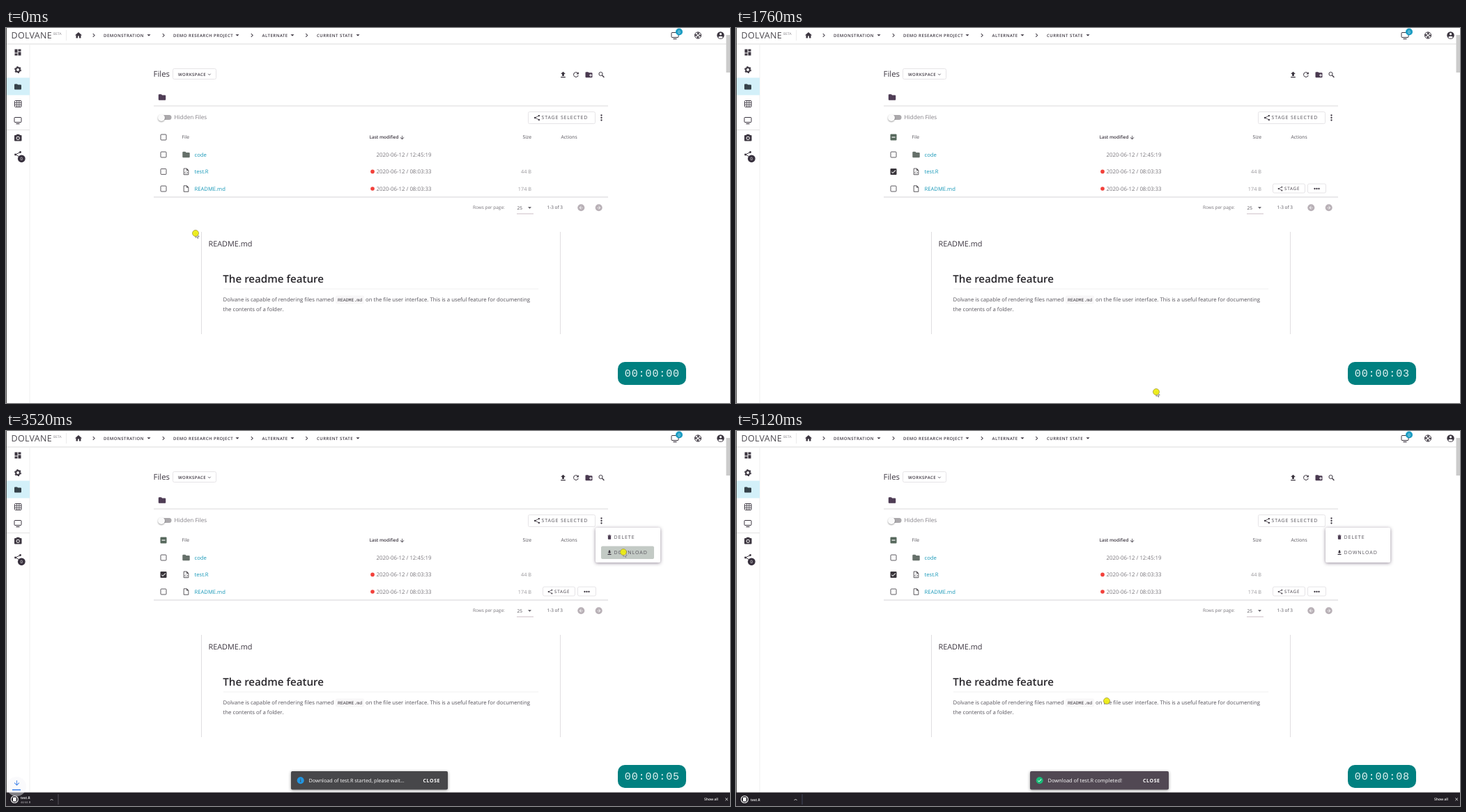
Animation of 1039 by 539 pixels, one loop 5.2 s. Source, as an HTML page with a canvas:

```html
<!DOCTYPE html>
<html lang="en">
<head>
<meta charset="utf-8">
<title>File download demo</title>
<style>
html, body { margin: 0; width: 100%; height: 100%; overflow: hidden; background: #fff; }
canvas { display: block; }
</style>
</head>
<body>
<canvas id="stage" width="1039" height="539"></canvas>
<script>
const ctx = document.getElementById('stage').getContext('2d');
const LOOP = 5200, STEP = 80;
const SANS = '"Open Sans", "Noto Sans", sans-serif';
const MONO = '"Liberation Mono", monospace';
const INK = '#3c3640', TEXT = '#55525a', LINK = '#1798b8', PALE = '#9a989c';

const ICONS = {
  home: 'M10 20v-6h4v6h5v-8h3L12 3 2 12h3v8z',
  folder: 'M10 4H4Q2 4 2 6v12q0 2 2 2h16q2 0 2-2V8q0-2-2-2h-8z',
  chevron: 'M10 6L8.6 7.4 13.2 12l-4.6 4.6L10 18l6-6z',
  drop: 'M6 9l6 6 6-6z',
  upload: 'M9 16h6v-6h4l-7-7-7 7h4zm-4 2h14v3H5z',
  download: 'M19 9h-4V3H9v6H5l7 7 7-7zM5 18v3h14v-3z',
  refresh: 'M17.6 6.4A8 8 0 1 0 19.7 14h-2.1A6 6 0 1 1 12 6q2.4 0 4.2 1.8L13 11h7V4z',
  dashboard: 'M3 13h8V3H3zm0 8h8v-6H3zm10 0h8V11h-8zm0-18v6h8V3z',
  trash: 'M6 19q0 2 2 2h8q2 0 2-2V7H6zM19 4h-3.5l-1-1h-5l-1 1H5v2h14z',
  arrow: 'M11 4v12.2l-5.6-5.6L4 12l8 8 8-8-1.4-1.4L13 16.2V4z',
  file: 'M14 2H6Q4 2 4 4v16q0 2 2 2h12q2 0 2-2V8zM6 4h7v5h5v11H6z',
  check: 'M9 16.2L4.8 12l-1.9 1.9L9 20 21.4 7.5l-1.9-1.9z'
};
for (const name in ICONS) ICONS[name] = new Path2D(ICONS[name]);

function icon(name, x, y, size, color, turn = 0) {
  ctx.save();
  ctx.translate(x, y);
  ctx.rotate(turn);
  ctx.scale(size / 24, size / 24);
  ctx.translate(-12, -12);
  ctx.fillStyle = color;
  ctx.fill(ICONS[name], 'evenodd');
  ctx.restore();
}

// y is the middle of the capitals
function text(str, x, y, size, color, { weight = 400, gap = 0, font = SANS, align = 'left' } = {}) {
  ctx.font = `${weight} ${size}px ${font}`;
  ctx.letterSpacing = gap + 'px';
  ctx.textRendering = 'geometricPrecision';
  ctx.textAlign = align;
  ctx.fillStyle = color;
  ctx.fillText(str, x, y + size * 0.357);
}

function rect(x, y, w, h, color) {
  ctx.fillStyle = color;
  ctx.fillRect(x, y, w, h);
}

function box(x, y, w, h, r, fill, stroke) {
  ctx.beginPath();
  ctx.roundRect(x, y, w, h, r);
  if (fill) { ctx.fillStyle = fill; ctx.fill(); }
  if (stroke) { ctx.strokeStyle = stroke; ctx.lineWidth = 1; ctx.stroke(); }
}

function disc(x, y, r, color) {
  ctx.beginPath();
  ctx.arc(x, y, r, 0, Math.PI * 2);
  ctx.fillStyle = color;
  ctx.fill();
}

function ring(x, y, r, color, width = 1, dash = []) {
  ctx.beginPath();
  ctx.arc(x, y, r, 0, Math.PI * 2);
  ctx.setLineDash(dash);
  ctx.strokeStyle = color;
  ctx.lineWidth = width;
  ctx.stroke();
  ctx.setLineDash([]);
}

function line(color, width, ...points) {
  ctx.beginPath();
  points.forEach(([x, y]) => ctx.lineTo(x, y));
  ctx.strokeStyle = color;
  ctx.lineWidth = width;
  ctx.stroke();
}

function withShadow(color, blur, dy, draw) {
  ctx.save();
  ctx.shadowColor = color;
  ctx.shadowBlur = blur;
  ctx.shadowOffsetY = dy;
  draw();
  ctx.restore();
}

const button = (x, y, w, h) => box(x + .5, y + .5, w - 1, h - 1, 2, '#fff', '#e6e4e7');

function share(x, y, s, color) {
  line(color, s * .09, [x + s * .32, y - s * .32], [x - s * .32, y], [x + s * .32, y + s * .32]);
  disc(x + s * .32, y - s * .32, s * .13, color);
  disc(x - s * .32, y, s * .13, color);
  disc(x + s * .32, y + s * .32, s * .13, color);
}

function monitor(x, y) {
  box(x - 5, y - 4.5, 10, 7, 1, null, INK);
  rect(x - 2.5, y + 4, 5, 1.2, INK);
}

function dots(x, y, dx, dy) {
  for (const i of [-1, 0, 1]) disc(x + i * dx, y + i * dy, 1.15, INK);
}

function checkbox(y, state) {
  if (!state) return box(222, y - 4, 8, 8, 1, '#fff', '#5d5a60');
  box(221.5, y - 4.5, 9, 9, 1, state === 'some' ? '#56685c' : '#39353b');
  if (state === 'some') rect(223.5, y - .6, 5, 1.2, '#fff');
  else icon('check', 226, y, 8, '#fff');
}

function topBar() {
  rect(0, 22.5, 1039, 1, '#dcdcdc');
  text('DOLVANE', 7.5, 10.5, 12.5, '#4a474d', { gap: .3 });
  text('BETA', 68, 8, 5, '#8b888d');
  rect(86, 3, 1, 15, '#ececec');
  icon('home', 104, 10.5, 12, INK);
  const crumbs = [
    ['DEMONSTRATION', 126, 140, 205], ['DEMO RESEARCH PROJECT', 226, 240, 332],
    ['ALTERNATE', 353, 367.5, 411], ['CURRENT STATE', 431.5, 446, 505]
  ];
  for (const [label, arrowX, x, dropX] of crumbs) {
    icon('chevron', arrowX, 10.5, 11, INK);
    text(label, x, 10.5, 6, INK, { weight: 600, gap: .5 });
    icon('drop', dropX, 10.5, 10, INK);
  }
  monitor(960, 11);
  disc(966, 5.5, 5, '#1b9cc2');
  text('0', 966, 5.5, 6, '#fff', { align: 'center' });
  ring(993, 10.5, 4.6, INK, 1);
  ring(993, 10.5, 2, INK, 1);
  const quarter = Math.PI * 3.3 / 2;
  ctx.lineDashOffset = quarter / 4;
  ring(993, 10.5, 3.3, INK, 1.8, [quarter / 2, quarter / 2]);
  ctx.lineDashOffset = 0;
  disc(1025.5, 10.5, 5.2, INK);
  disc(1025.5, 8.7, 1.6, '#fff');
  ctx.beginPath();
  ctx.ellipse(1025.5, 13.2, 3.1, 1.5, 0, 0, Math.PI * 2);
  ctx.fill();
  rect(1033.5, 10, 5.5, 54, '#cbcbcb');
}

function sideBar() {
  rect(33.5, 24, 1, 515, '#f0f0f0');
  rect(1, 71.5, 33, 25, '#d3f0f9');
  icon('dashboard', 17, 35, 12, INK);
  ring(17, 60, 2.9, INK, 2);
  ring(17, 60, 4.4, INK, 1.2, [2.3, 2.3]);
  icon('folder', 17, 84.5, 12, '#35424a');
  box(12.5, 104.5, 9.5, 9, 1, null, INK);
  for (const x of [15.6, 18.8]) line(INK, .8, [x, 104.5], [x, 113.5]);
  for (const y of [107.5, 110.5]) line(INK, .8, [12.5, y], [22, y]);
  monitor(17, 133);
  rect(1, 146, 33, 1, '#e2e2e2');
  box(12, 154, 10.5, 8.5, 1, INK);
  rect(15, 152.8, 4.5, 2, INK);
  ring(17.2, 158.3, 2.2, '#fff', 1);
  share(17, 182, 11, INK);
  disc(22.3, 187.8, 5.4, '#38313e');
  text('0', 22.3, 187.8, 6, '#fff', { align: 'center' });
  rect(0, 0, 1, 539, '#4a4a4a');
}

function toolbar() {
  text('Files', 211.5, 66, 11.4, INK);
  button(239, 58, 63, 16);
  text('WORKSPACE', 247, 66.5, 6, INK, { weight: 600, gap: .5 });
  line(INK, .8, [290, 65.8], [291.8, 67.6], [293.6, 65.8]);
  icon('upload', 799.5, 67, 11.5, INK);
  icon('refresh', 818, 67, 11.5, INK);
  icon('folder', 836.5, 67.3, 12, '#4a3a50');
  rect(837, 67.5, 4, 1, '#fff');
  rect(838.5, 66, 1, 4, '#fff');
  ring(853.5, 66, 2.6, INK, 1);
  line(INK, 1.3, [855.5, 68], [858.4, 71]);
  icon('folder', 224, 99.5, 12.5, '#4f3d55');
  rect(212, 111.5, 652, 1, '#dbd9dc');
  box(221, 125, 16.5, 7, 3.5, '#aaa8ab');
  withShadow('rgba(0,0,0,.4)', 2, 1, () => disc(223, 129, 5, '#fbfbfb'));
  text('Hidden Files', 241.5, 128, 8.2, '#858288');
  button(749, 120, 97, 18);
  share(762, 129, 9, INK);
  text('STAGE SELECTED', 768.5, 129, 7, TEXT, { gap: .85 });
  dots(854.5, 129, 0, 3.5);
}

function fileTable(picked, hoverRow) {
  checkbox(157, picked && 'some');
  text('File', 252.5, 157, 6.6, TEXT);
  text('Last modified', 521.5, 157, 6.4, INK, { weight: 600 });
  icon('arrow', 568.5, 157.5, 8.5, INK);
  text('Size', 754, 157, 6.8, TEXT, { align: 'right' });
  text('Actions', 796.5, 157, 6.8, TEXT);
  const rows = [
    ['code', 182, '12:45:19', ''], ['test.R', 206.4, '08:03:33', '44 B'], ['README.md', 231, '08:03:33', '174 B']
  ];
  rows.forEach(([name, y, time, size], i) => {
    checkbox(y, i === 1 && picked && 'on');
    icon(i ? 'file' : 'folder', 258.5, y, i ? 11.5 : 12.5, i ? '#5a575c' : '#66706a');
    if (i === 1) {
      line('#5a575c', .8, [257.8, y], [256.5, y + 1.5], [257.8, y + 3]);
      line('#5a575c', .8, [259.2, y], [260.5, y + 1.5], [259.2, y + 3]);
    }
    text(name, 270.5, y, 7.65, LINK);
    if (i) disc(526, y, 2.8, '#f2403a');
    text('2020-06-12 / ' + time, 531.5, y, 7.85, '#77747a');
    text(size, 754, y, 7.3, PALE, { align: 'right' });
    if (i === hoverRow) {
      button(770, y - 7.5, 47, 14);
      share(781, y, 7.5, INK);
      text('STAGE', 787, y, 6.2, INK, { gap: .8 });
      button(820, y - 7.5, 27, 14);
      dots(833.5, y, 3, 0);
    }
  });
  rect(212, 242.5, 652, 1, '#d6d4d7');
  text('Rows per page:', 670, 258, 6.45, '#77747a');
  text('25', 733.5, 258.3, 6.5, TEXT);
  icon('drop', 751.5, 258.5, 10, TEXT);
  rect(733, 266.5, 24, 1, '#cbbdc6');
  text('1-3 of 3', 776.5, 258, 6.45, TEXT);
  disc(825.3, 258.3, 5, '#b9b1b7');
  icon('arrow', 825.3, 258.3, 7.5, '#fff', Math.PI / 2);
  disc(850.7, 258.3, 5, '#b9b1b7');
  icon('arrow', 850.7, 258.3, 7.5, '#fff', -Math.PI / 2);
}

function preview() {
  rect(280, 293, 1, 147, '#e0dee1');
  rect(795, 293, 1, 147, '#e0dee1');
  text('README.md', 290.5, 310, 10.85, INK);
  text('The readme feature', 311.3, 360.5, 15.15, '#28262b', { weight: 600 });
  rect(312, 374.5, 452, 1, '#f2f2f2');
  text('Dolvane is capable of rendering files named', 311.5, 390, 7.8, TEXT);
  box(473, 384.5, 41, 12, 2, '#f8f7f8');
  text('README.md', 476, 390.6, 6.5, '#39363c', { font: MONO });
  text('on the file user interface. This is a useful feature for documenting', 516, 390, 7.78, TEXT);
  text('the contents of a folder.', 311.5, 404, 7.8, TEXT);
}

function menu(highlight) {
  withShadow('rgba(40,20,50,.5)', 5, 1, () => box(846, 139, 93, 50, 2, '#fff'));
  if (highlight) box(854, 165.5, 76, 18.5, 2, '#c3cac5');
  icon('trash', 866, 152.5, 8.5, '#4a3a50');
  text('DELETE', 872.5, 152.5, 7, TEXT, { gap: .95 });
  icon('download', 866, 174.7, 8.5, INK);
  text('DOWNLOAD', 872.5, 174.7, 7, TEXT, { gap: .95 });
}

function toast(x, y, w, message, closeX, done, alpha) {
  ctx.save();
  ctx.globalAlpha = alpha;
  withShadow('rgba(0,0,0,.4)', 4, 1, () => box(x, y, w, 26.5, 2, done ? '#514853' : '#47474a'));
  ctx.globalAlpha = 1;
  const cx = x + 13.7, cy = y + 13.2;
  disc(cx, cy, 5, done ? '#19bb78' : '#2196e3');
  if (done) icon('check', cx, cy, 7, '#fff');
  else {
    rect(cx - .5, cy - .7, 1, 3.2, '#47474a');
    rect(cx - .5, cy - 2.5, 1, 1, '#47474a');
  }
  text(message, x + 25.5, cy, done ? 7.45 : 7.25, '#fff');
  text('CLOSE', closeX, cy, 7, '#fff', { weight: 700, gap: .6 });
  ctx.restore();
}

function downloadBar(t) {
  const settled = t >= 3920;
  rect(0, 519.5, 1039, 19.5, '#221f25');
  const edge = settled ? 95 : 75;
  rect(edge - .5, 522, 1, 15, settled ? '#40475c' : '#55525a');
  line('#ddd', .9, [edge - 11.5, 531], [edge - 9.5, 529], [edge - 7.5, 531]);
  text('test.R', 21, settled ? 530 : 527.3, 5, '#fff', { weight: 600 });
  if (!settled) text('44/44 B', 21, 533.7, 4, '#c4c2c6');
  ring(12.3, 529.5, 5, '#e9e9e9', 1.2);
  box(10, 526.5, 4.6, 6, .8, '#fff');
  text('Show all', 1002, 529.3, 5, '#fff', { weight: 600 });
  line('#ddd', .9, [1032.3, 527.5], [1036, 531.2]);
  line('#ddd', .9, [1036, 527.5], [1032.3, 531.2]);
  if (t < 3840) {
    const drop = (t - 3680) / 16;
    ctx.save();
    ctx.globalAlpha = .45;
    disc(15, 521 + drop, 14, '#f4f5f8');
    ctx.restore();
    icon('arrow', 15.5, 516 + drop, 11, '#3b7fe8');
    rect(9, 525 + drop, 12, 1.5, '#3b7fe8');
  }
}

// time, x, y
const PATH = [
  [720, 272, 295], [960, 212, 258], [1120, 169, 223], [1200, 180, 218], [1280, 204, 217],
  [1360, 222, 208], [1440, 226, 206], [1520, 240, 218], [1600, 340, 305], [1680, 500, 445],
  [1760, 603, 523], [1840, 625, 519], [2160, 850, 360], [2400, 1025, 150], [2480, 930, 135],
  [2560, 868, 130], [2640, 859, 129], [2880, 857, 130], [3040, 870, 152], [3200, 886, 174],
  [3520, 886, 174], [3600, 745, 240], [3680, 594, 313], [3760, 556, 355], [3920, 533, 386], [4000, 532, 388]
];
const CLICKS = [1440, 2640, 3280];

function pointerAt(t) {
  const next = PATH.findIndex(p => p[0] >= t);
  if (next < 0) return PATH[PATH.length - 1].slice(1);
  if (next === 0) return PATH[0].slice(1);
  const [t0, x0, y0] = PATH[next - 1], [t1, x1, y1] = PATH[next];
  const k = (t - t0) / (t1 - t0);
  return [x0 + (x1 - x0) * k, y0 + (y1 - y0) * k];
}

function pointer(t) {
  const [x, y] = pointerAt(t);
  const r = Math.max(4.5, ...CLICKS.map(c => 12 - Math.abs(t - c) / 21.5));
  if (t < 3920) {
    ctx.beginPath();
    [[0, -1], [0, 6.5], [1.7, 5], [3, 7.5], [4, 7], [3, 4.6], [5.2, 4.6]]
      .forEach(([dx, dy]) => ctx.lineTo(x + dx, y + dy));
    ctx.closePath();
    ctx.fillStyle = '#fff';
    ctx.fill();
    ctx.strokeStyle = '#77757a';
    ctx.lineWidth = .8;
    ctx.stroke();
  }
  ctx.save();
  ctx.globalAlpha = r > 5 && r < 11 ? .8 : .93;
  disc(x, y, r, r > 5 ? '#ffe81c' : '#eeee10');
  ring(x, y, r, '#9c9340', .8);
  ctx.restore();
}

function timer(t) {
  const seconds = t < 480 ? 0 : 1 + Math.floor((t - 480) / 640);
  box(878, 480, 98, 33, 10, '#008080');
  text('00:00:0' + seconds, 887.8, 495.3, 15, '#e4f3f3', { font: MONO, gap: .9 });
}

function draw(t) {
  rect(0, 0, 1039, 539, '#fff');
  topBar();
  sideBar();
  toolbar();
  fileTable(t >= 1440, t < 1360 ? -1 : t < 1520 ? 1 : 2);
  preview();
  if (t >= 2720) menu(t >= 3120 && t < 3600);
  if (t >= 3520) downloadBar(t);
  if (t >= 3600) toast(422, 489, 199, 'Download of test.R completed!', 584, true, 1);
  else if (t >= 3360) {
    toast(409, t < 3520 ? 509.5 : 489, 225, 'Download of test.R started, please wait...', 598.5, false, t < 3440 ? .7 : 1);
  }
  timer(t);
  pointer(t);
}

const start = performance.now();
function tick() {
  const t = (performance.now() - start) % LOOP;
  draw(Math.floor(t / STEP) * STEP);
  requestAnimationFrame(tick);
}
tick();
</script>
</body>
</html>
```
